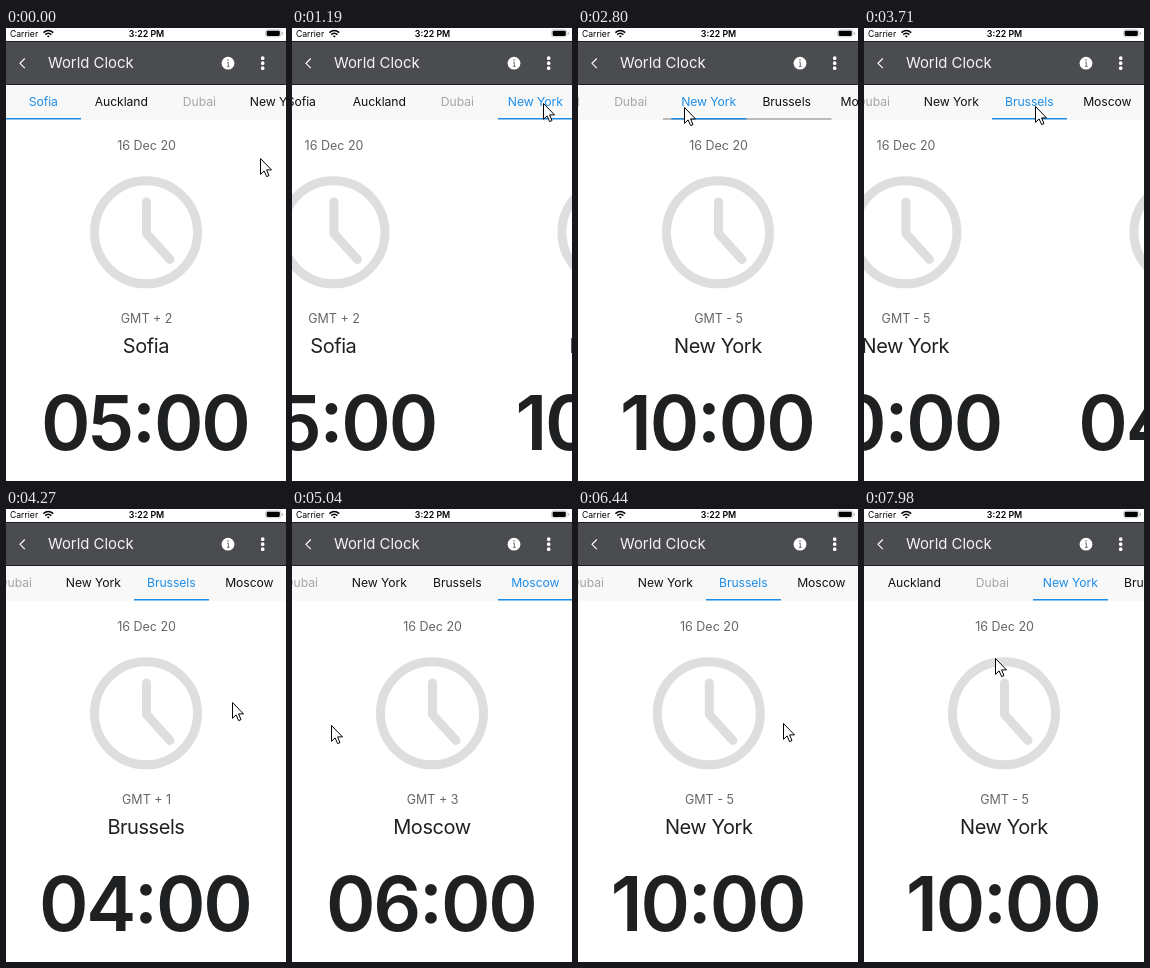
Write an HTML page that moves like this. It is 280 px wide and 453 px high and loops after 8 s.

```html
<!DOCTYPE html>
<html lang="en">
<head>
<meta charset="utf-8">
<title>World Clock</title>
<style>
html, body { margin: 0; width: 100%; height: 100%; overflow: hidden; background: #fff; }
svg { display: block; width: 280px; height: 453px; font-family: Inter, Roboto, sans-serif; }
.mid { text-anchor: middle; }
.tab { font-size: 12.2px; letter-spacing: -.08px; }
.note { font-size: 12.5px; fill: #666; }
.city { font-size: 20px; fill: #1f2022; letter-spacing: -.45px; }
.time {
  font-size: 75px; font-weight: 600; fill: #1f2022; letter-spacing: -2.1px;
  font-feature-settings: "case", "calt";
}
</style>
</head>
<body>
<svg viewBox="0 0 280 453">
  <rect width="280" height="453" fill="#fff"/>
  <g id="pages"></g>

  <rect y="56" width="280" height="36" fill="#f8f8f8"/>
  <g id="strip"></g>
  <rect id="thumb" y="90" width="169" height="2" rx="1"/>
  <rect id="line" y="90" width="75" height="1.5" fill="#1f8de6"/>

  <text x="4" y="9" font-size="8.6">Carrier</text>
  <path d="M37.4 4.6Q42.3 .4 47.2 4.6M39.2 6.6Q42.3 4 45.4 6.6" fill="none" stroke="#000" stroke-width="1.5"/>
  <path d="M42.3 9.6L40.8 7.9Q42.3 6.9 43.8 7.9Z"/>
  <text class="mid" x="140.5" y="9" font-size="8.8" font-weight="600">3:22 PM</text>
  <rect x="259.5" y="1.8" width="15.4" height="7" rx="2" fill="none" stroke="#bbb" stroke-width=".7"/>
  <rect x="260.6" y="2.7" width="13.2" height="5.2" rx="1.1"/>
  <rect x="275.8" y="4.2" width="1" height="2.3" rx=".5" fill="#999"/>

  <rect y="13" width="280" height="44" fill="#4a4c50"/>
  <path d="M0 13.5H280M0 56.5H280" stroke="#1d1e20"/>
  <path d="M18.8 30.5L14 35.3L18.8 40.1" fill="none" stroke="#fff" stroke-width="1.1"/>
  <text x="42" y="40.3" font-size="14.9" fill="#f4f4f4">World Clock</text>
  <circle cx="222" cy="35.2" r="6.4" fill="#fff"/>
  <path d="M221.2 34.2H222.3V38.3M221 38.4H223.6" fill="none" stroke="#4a4c50" stroke-width=".8"/>
  <circle cx="222" cy="32" r=".7" fill="#4a4c50"/>
  <path d="M256.7 30.2v0m0 5v0m0 5v0" stroke="#fff" stroke-width="3.7" stroke-linecap="round"/>

  <path id="cursor" d="M.5 .5V16.3L4.1 12.9L6.6 18.6L9 17.6L6.6 11.9H11.5Z"
    fill="#fff" stroke="#000" stroke-linejoin="round"/>
</svg>
<script>
const NS = "http://www.w3.org/2000/svg";
const LOOP = 8000, STEP = 70, WIDTH = 280, PITCH = 78, SLIDE = 350;
const byId = id => document.getElementById(id);

const tabs = ["Sofia", "Auckland", "Dubai", "New York", "Brussels", "Moscow"];
const pages = [
  { city: "Sofia", zone: "GMT + 2", time: "05:00" },
  { city: "New York", zone: "GMT - 5", time: "10:00" },
  { city: "Brussels", zone: "GMT + 1", time: "04:00" },
  { city: "Moscow", zone: "GMT + 3", time: "06:00" }
];

// A tap marks its tab at once, a swipe when the page has settled
const slides = [
  { at: 1050, page: 1 },
  { at: 3570, page: 2 },
  { at: 4380, page: 3, swipe: true },
  { at: 5430, page: 2, swipe: true },
  { at: 6128, page: 1, swipe: true }
];

// Legs of motion: [from ms, to ms, ...goal]
const pageLegs = slides.map(s => [s.at, s.at + SLIDE, s.page]);
const scrollLegs = [[1050, 1190, 28], [2450, 3190, 184], [6930, 7350, 65]];
const cursorLegs = [
  [0, 560, 251, 75],
  [1540, 1960, 217, 188],
  [2100, 2450, 220, 79],
  [2450, 2800, 106, 79],
  [2940, 3430, 171, 78],
  [3850, 4270, 226, 193],
  [4340, 4830, 29, 215],
  [4900, 5250, 57, 219],
  [5390, 5670, 212, 214],
  [5670, 5880, 72, 209],
  [6090, 6440, 205, 214],
  [6440, 6930, 93, 84],
  [6930, 7350, 212, 82],
  [7420, 7630, 70, 71],
  [7770, 7980, 131, 149]
];

const smooth = p => p * p * (3 - 2 * p);
const easeOut = p => 1 - (1 - p) ** 2;
const progress = (t, from, to) => Math.min(1, Math.max(0, (t - from) / (to - from)));

function travel(legs, start, t, ease) {
  return legs.reduce((at, [from, to, ...goal]) => {
    const p = ease(progress(t, from, to));
    return at.map((v, i) => v + (goal[i] - v) * p);
  }, start);
}

function add(parent, tag, attrs = {}, text = "") {
  const el = document.createElementNS(NS, tag);
  for (const name in attrs) el.setAttribute(name, attrs[name]);
  el.textContent = text;
  return parent.appendChild(el);
}

const move = (el, x, y = 0) => el.setAttribute("transform", `translate(${x} ${y})`);

const tabEls = tabs.map((name, i) =>
  add(byId("strip"), "text", { class: "tab mid", x: i * PITCH + 37.3, y: 78 }, name));

const pageEls = pages.map(({ city, zone, time }) => {
  const root = add(byId("pages"), "g");
  const label = (cls, x, y, text) => add(root, "text", { class: "mid " + cls, x, y }, text);
  label("note", 140.6, 122, "16 Dec 20");
  const dial = add(root, "g", {
    fill: "none", stroke: "#dedede", "stroke-width": 9,
    "stroke-linecap": "round", "stroke-linejoin": "round"
  });
  add(dial, "circle", { cx: 140, cy: 204.3, r: 51.5 });
  add(dial, "path", { d: "M140.5 174V205.5L164 231.5" });
  label("note", 140.6, 295.3, zone);
  label("city", 139.9, 325, city);
  label("time", 138.8, 421.7, time);
  return root;
});

function draw(ms) {
  const t = Math.floor(ms / STEP) * STEP;
  const [pos] = travel(pageLegs, [0], t, smooth);
  const [scroll] = travel(scrollLegs, [0], t, easeOut);
  const [x, y] = travel(cursorLegs, [254, 130], t, smooth);

  pageEls.forEach((el, i) => move(el, (i - pos) * WIDTH));

  const shown = slides.filter(s => t >= s.at + (s.swipe ? SLIDE : 0)).pop();
  const active = tabs.indexOf(pages[shown ? shown.page : 0].city);
  move(byId("strip"), -scroll);
  tabEls.forEach((el, i) =>
    el.setAttribute("fill", i === active ? "#1f8de6" : tabs[i] === "Dubai" ? "#a5a5a5" : "#111"));
  byId("line").setAttribute("x", active * PITCH - scroll);

  // The scroll thumb shows only while the strip moves
  const leg = scrollLegs.find(([from, to]) => t > from && t < to);
  const left = leg ? 1 - progress(t, leg[0], leg[1]) : 0;
  const thumb = byId("thumb");
  thumb.setAttribute("x", scroll * WIDTH / (tabs.length * PITCH - 3));
  thumb.setAttribute("opacity", .25 * Math.min(1, 8 * left));

  move(byId("cursor"), Math.round(x), Math.round(y));
}

const start = performance.now();
function tick() {
  draw((performance.now() - start) % LOOP);
  requestAnimationFrame(tick);
}
tick();
</script>
</body>
</html>
```
